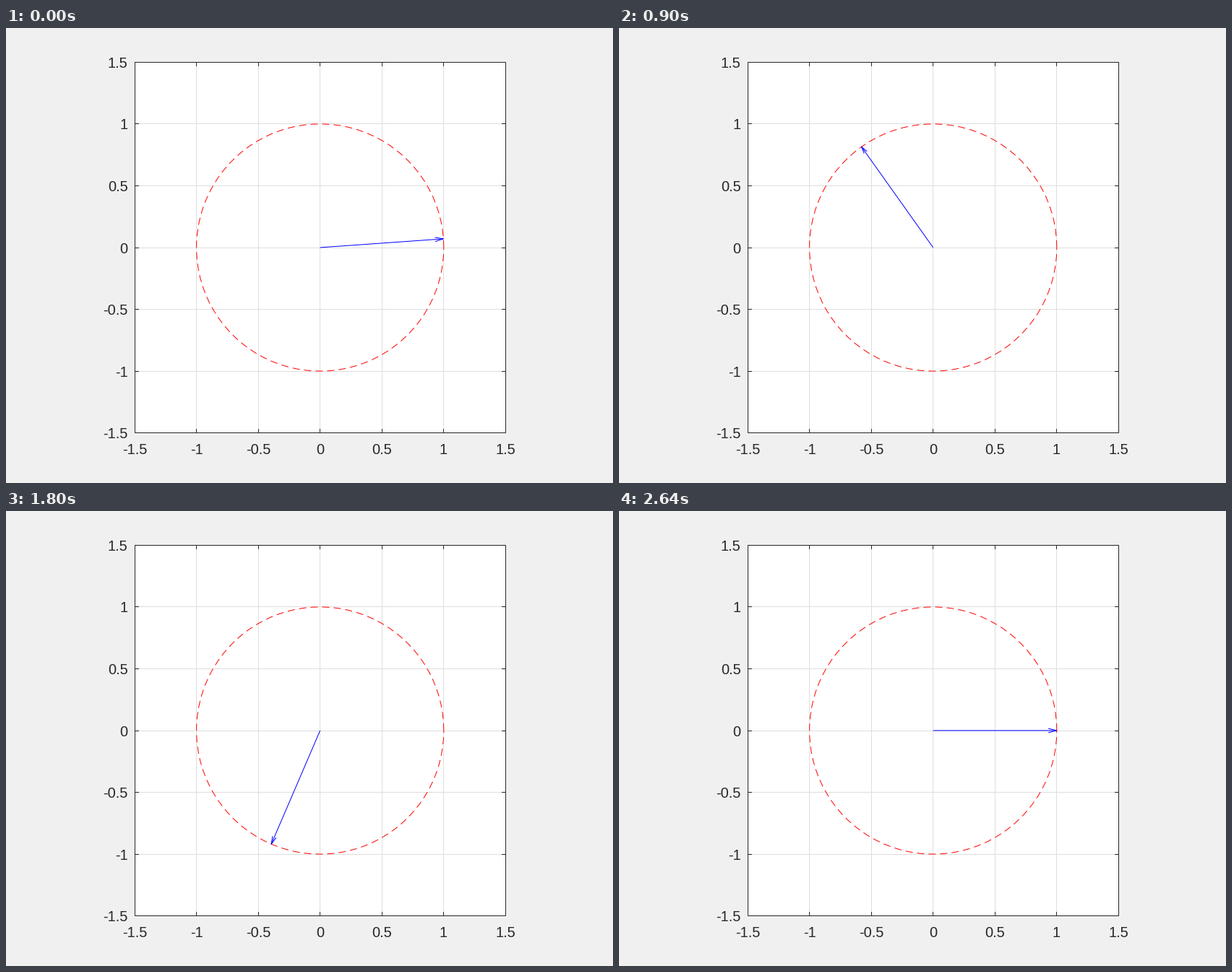
These frames come from a looping animation (840 px wide and 630 px high, 2.67 s). A matplotlib script:

```python
import math

import numpy as np
import matplotlib.pyplot as plt
from matplotlib.animation import FuncAnimation
from matplotlib.patches import Rectangle

W, H, DPI = 840, 630, 100
PX = 72 / DPI                     # one pixel in points
CX, CY, UNIT = 434.7, 303.975, 171.15
STEPS, INTERVAL = 89, 30
HEAD_LEN, HEAD_HALF = 11.8, 2.9
INK = "#262626"
TICKS = np.arange(-1.5, 1.6, 0.5)

fig = plt.figure(figsize=(W / DPI, H / DPI), dpi=DPI, facecolor="#f0f0f0")
ax = fig.add_axes([0, 0, 1, 1])
ax.set_xlim(0, W)
ax.set_ylim(H, 0)
ax.axis("off")


def crisp(v):
    """Centre of the pixel that holds v."""
    return math.floor(v + 0.1) + 0.5


def col(x):
    return crisp(CX + UNIT * x)


def row(y):
    return crisp(CY - UNIT * y)


def line(xs, ys, color, z, **kw):
    return ax.plot(xs, ys, color=color, lw=PX, zorder=z, snap=False, **kw)[0]


def label(x, y, value, align):
    ax.text(x, y, f"{value:g}", family="Liberation Sans", size=20 * PX,
            color=INK, ha=align, va="baseline")


left, right = col(-1.5), col(1.5)
top, bottom = row(1.5), row(-1.5)
ax.add_patch(Rectangle((left, top), right - left, bottom - top,
                       fc="white", ec="none", zorder=0))

for t in TICKS:
    x, y = col(t), row(t)
    if abs(t) < 1.5:
        line([x, x], [top, bottom], "#dedede", 1)
        line([left, right], [y, y], "#dedede", 1)
        for edge, d in ((top, 5.5), (bottom, -5.5)):
            line([x, x], [edge, edge + d], INK, 4, solid_capstyle="butt")
        for edge, d in ((left, 5.5), (right, -5.5)):
            line([edge, edge + d], [y, y], INK, 4, solid_capstyle="butt")
    label(x, 590, t, "center")
    label(168.5, y + 7.5, t, "right")

# Blend crossings of the grid slightly darker than its lines are not needed:
# the frame closes the plot area on top of everything static.
line([left, right, right, left, left], [top, top, bottom, bottom, top], INK, 4,
     solid_joinstyle="miter")

theta = np.linspace(0, 2 * np.pi, 90)
line(CX + UNIT * np.cos(theta), CY - UNIT * np.sin(theta), "red", 5,
     linestyle=(0, (10, 6)), dash_capstyle="butt")

shaft = line([], [], "blue", 6, solid_capstyle="butt")
head = line([], [], "blue", 6, solid_capstyle="butt", solid_joinstyle="bevel")


def update(k):
    a = 2 * np.pi * (k + 1) / STEPS
    along = np.array([np.cos(a), -np.sin(a)])
    across = np.array([np.sin(a), np.cos(a)])
    tip = np.array([CX, CY]) + UNIT * along
    # the head shrinks with the larger component of the vector
    size = np.abs(along).max()
    base = tip - HEAD_LEN * size * along
    wing = HEAD_HALF * size * across
    shaft.set_data([CX, tip[0]], [CY, tip[1]])
    head.set_data(*np.array([base + wing, tip, base - wing]).T)
    return shaft, head


anim = FuncAnimation(fig, update, frames=STEPS, interval=INTERVAL,
                     repeat=True, repeat_delay=0, blit=False)
plt.show()
```
